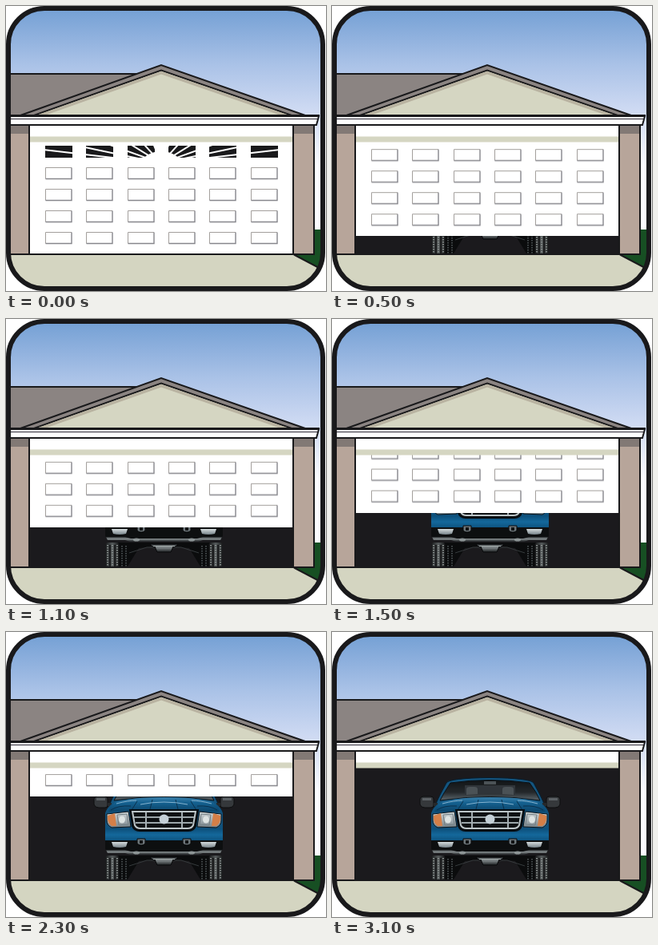
An HTML page that plays this animation: 400 by 357 pixels, repeating every 3200 ms.

```html
<!DOCTYPE html>
<html lang="en">
<head>
<meta charset="utf-8">
<title>Garage door</title>
<style>
  html, body { margin: 0; width: 100%; height: 100%; overflow: hidden; background: #fff; }
  svg { display: block; width: 100%; height: 100%; }
</style>
</head>
<body>
<svg viewBox="0 0 400 357">
  <defs>
    <linearGradient id="sky" x1="0" y1="6" x2="0" y2="200" gradientUnits="userSpaceOnUse">
      <stop offset="0" stop-color="#76a1d5"/>
      <stop offset=".35" stop-color="#aac2e7"/>
      <stop offset=".68" stop-color="#d3ddf4"/>
      <stop offset="1" stop-color="#fcfcff"/>
    </linearGradient>
    <linearGradient id="glass" x1="0" y1="0" x2="0" y2="1">
      <stop offset="0" stop-color="#111416"/>
      <stop offset=".6" stop-color="#24282b"/>
      <stop offset="1" stop-color="#5d676d"/>
    </linearGradient>
    <linearGradient id="hood" x1="0" y1="0" x2="0" y2="1">
      <stop offset="0" stop-color="#3a80ab"/>
      <stop offset=".4" stop-color="#14608f"/>
      <stop offset="1" stop-color="#0c4469"/>
    </linearGradient>
    <linearGradient id="bumper" x1="0" y1="0" x2="0" y2="1">
      <stop offset="0" stop-color="#0d4e79"/>
      <stop offset=".5" stop-color="#14689b"/>
      <stop offset="1" stop-color="#0d527e"/>
    </linearGradient>
    <linearGradient id="lamp" x1="0" y1="0" x2="0" y2="1">
      <stop offset="0" stop-color="#d5dcdd"/>
      <stop offset="1" stop-color="#77838a"/>
    </linearGradient>
    <linearGradient id="metal" x1="0" y1="0" x2="0" y2="1">
      <stop offset="0" stop-color="#2b2f31"/>
      <stop offset=".4" stop-color="#848b8d"/>
      <stop offset="1" stop-color="#1d2022"/>
    </linearGradient>
    <linearGradient id="tire">
      <stop offset="0" stop-color="#1b1d1e"/>
      <stop offset=".5" stop-color="#555a5b"/>
      <stop offset="1" stop-color="#141516"/>
    </linearGradient>
    <clipPath id="scene"><rect x="4" y="4" width="391" height="350" rx="44"/></clipPath>
    <clipPath id="opening"><rect x="30" y="170" width="328" height="141"/></clipPath>
    <clipPath id="panes"></clipPath>

    <g id="truckHalf">
      <path d="M110 209q1-3 4-3h9q4 0 4 3v8q0 3-3 3h-8q-5 0-6-4z" fill="#35383b" stroke="#0c0d0e"/>
      <path d="M113 208h11v3h-11z" fill="#5c6165"/>
      <path d="M127 214h5v4h-5z" fill="#25282b"/>
      <path d="M198 262h-74v-35q2-7 9-12l65-1z" fill="#10517c"/>
      <path d="M128 225q3-9 9-12 20-6 61-6v18z" fill="url(#hood)"/>
      <path d="M131 223q9-6 25-5M157 223l7-11M180 222l3-12" fill="none" stroke="#0a304c"/>
      <path d="M138 215q15-4 25-4M168 216q14-3 30-3" fill="none" stroke="#85b3d0"/>
      <path d="M126 228l27-3 3 19-24 1q-6-3-6-9z" fill="url(#lamp)" stroke="#0b1319"/>
      <path d="M127 230l9-3 2 16h-6q-5-4-5-9z" fill="#d47f48"/>
      <path d="M139 229l12-1 2 13-12 1z" fill="none" stroke="#727d82"/>
      <ellipse cx="145" cy="235" rx="4" ry="4.500" fill="#dde3e2"/>
      <path d="M124 246h32q4 5 12 5h30v11h-74z" fill="url(#bumper)"/>
      <path d="M124 261h74v15h-70l-4-4z" fill="#0d0f10"/>
      <path d="M132 263h20l-2 6q-8 2-16 0z" fill="url(#lamp)"/>
      <path d="M164 259h10v6q-2 2-5 2t-5-2z" fill="#6d767a" stroke="#08090a"/>
      <path d="M167 261h4v4h-4z" fill="#111314"/>
      <path d="M125 273h24l7 2h42v4h-43l-6-2h-22z" fill="url(#metal)"/>
      <ellipse cx="163" cy="276.500" rx="4" ry="2" fill="#8d9596"/>
      <path d="M140 280h58v4l-32 3-14 23h-12z" fill="#0b0c0d"/>
      <path d="M154 293l22-7h22" fill="none" stroke="#363b3d"/>
      <rect x="124.500" y="280" width="17" height="31" rx="3" fill="url(#tire)"/>
      <path d="M130 283v27M136 283v27" stroke="#101112" stroke-width="1.500"/>
      <path d="M127 283v27M133 283v27M139 283v27" stroke="#858b8a" stroke-width="2" stroke-dasharray="1.500 1.500"/>
      <path d="M145 284v26M150 284v26" stroke="#43484a" stroke-width="2" stroke-dasharray="1.500 1.500"/>
    </g>
  </defs>

  <g clip-path="url(#scene)">
    <rect width="400" height="357" fill="url(#sky)"/>

    <g stroke="#19191b" stroke-width="2">
      <path d="M0 85H165V137H0z" fill="#8b8482"/>
      <path d="M18 137L194 74 374 137z" fill="#8b8482"/>
      <path d="M35 137L194 80.500 357 137z" fill="#d5d6c2"/>
    </g>
    <path d="M39 136.500L194 81.700 353 136.500h-11L194 85.500 50 136.500z" fill="#b9b3a1"/>

    <path d="M385 280h10v50h-10l-25-18h25z" fill="#174f23"/>
    <path d="M0 311H360L395 330V357H0z" fill="#d4d5c1"/>
    <path d="M360 311.500L395 330" stroke="#19191b" stroke-width="2"/>

    <g fill="#b7a59a">
      <path d="M0 150h29v161H0zM359 150h26v161h-26z"/>
      <path d="M0 150h29v10H0zM359 150h26v10h-26z" fill="#827975"/>
    </g>
    <rect x="29" y="150" width="330" height="161" fill="#1b1a1d"/>

    <g id="truck">
      <path d="M129 217Q134 205 143 189q4-6 54-6.500 50 .500 55 6.500 9 16 14 28z" fill="#14557f" stroke="#081c2b"/>
      <path d="M148 189q49-7 99 0 9 12 13 22-62-9-125 0 5-10 13-22z" fill="url(#glass)" stroke="#0a1116"/>
      <path d="M166 204v-12h63v12q-32-3-63 0z" fill="#30353a"/>
      <path d="M168 204v-7q0-3 4-3h6q4 0 4 3v6zM213 203v-6q0-3 4-3h6q4 0 4 3v7z" fill="#4b5256"/>
      <path d="M190 187h15v4h-15z" fill="#4b5256"/>
      <use href="#truckHalf"/>
      <use href="#truckHalf" transform="matrix(-1 0 0 1 395 0)"/>
      <path d="M155 223h85l-3 20q-2 6-9 6h-61q-7 0-9-6z" fill="#0e1113" stroke="#060d12" stroke-width="2"/>
      <path d="M158 225h79l-3 17q-2 4-7 4h-59q-5 0-7-4z" fill="none" stroke="#bcc5c8" stroke-width="2"/>
      <path d="M160 232h75M162 239h71" stroke="#9ba6aa" stroke-width="2"/>
      <path d="M175 226v19M220 226v19" stroke="#a4aeb2" stroke-width="2"/>
      <circle cx="197.500" cy="234.500" r="6" fill="#c4d0d7"/>
      <path d="M180 282h35l-3 3h-3l-3 7h-17l-3-7h-3z" fill="url(#metal)" stroke="#08090a"/>
      <path d="M184 284.500h27" stroke="#a6aeae"/>
    </g>

    <g clip-path="url(#opening)">
      <g id="door">
        <rect x="30" y="150" width="328" height="161" fill="#fff"/>
        <g clip-path="url(#panes)">
          <rect x="40" y="170" width="310" height="25" fill="#19191b"/>
          <g id="rays" stroke="#fff" stroke-width="2"></g>
          <ellipse cx="194" cy="197" rx="24" ry="15" fill="#fff"/>
        </g>
        <g id="panels" fill="none"></g>
      </g>
    </g>

    <rect x="30" y="150" width="328" height="14" fill="#fff"/>
    <rect x="30" y="163.500" width="328" height="7" fill="#d5d6c2"/>
    <path d="M29 150V311M359 150V311M385 150V311M0 311H386" fill="none" stroke="#19191b" stroke-width="2"/>

    <path d="M0 138H391L388 149H0z" fill="#fff" stroke="#19191b" stroke-width="2"/>
    <path d="M0 141.500H390" stroke="#2a2733"/>
    <path d="M0 137.500H392" stroke="#19191b" stroke-width="3"/>
  </g>
  <rect x="3" y="3" width="393" height="351" rx="45" fill="none" stroke="#19191b" stroke-width="6"/>
</svg>
<script>
  const byId = id => document.getElementById(id);

  function add(parent, tag, attrs) {
    const node = document.createElementNS('http://www.w3.org/2000/svg', tag);
    for (const [name, value] of Object.entries(attrs)) node.setAttribute(name, value);
    parent.append(node);
  }

  for (let col = 0; col < 6; col++) {
    const x = Math.round(49 + col * 51.3);
    add(byId('panes'), 'rect', { x, y: 175, width: 34, height: 15 });
    for (let row = 0; row < 4; row++) {
      const y = 202.5 + row * 27;
      add(byId('panels'), 'path', { d: `M${x + .5} ${y + 14}V${y}H${x + 33}`, stroke: '#a39f9c' });
      add(byId('panels'), 'path', {
        d: `M${x + .5} ${y + 14}H${x + 33}V${y}`, stroke: '#86868c', 'stroke-width': 1.4
      });
    }
  }

  // Window bars fan out from the middle of the door.
  for (const slope of [.115, .21, .36, .62, 1.1, 2.5]) {
    for (const side of [-1, 1]) {
      add(byId('rays'), 'line', { x1: 194, y1: 197, x2: 194 + side * 150, y2: 197 - slope * 150 });
    }
  }

  byId('door').animate(
    { transform: ['translateY(0)', 'translateY(-146px)'] },
    { duration: 3200, iterations: Infinity, easing: 'steps(32, end)' }
  );
</script>
</body>
</html>
```
